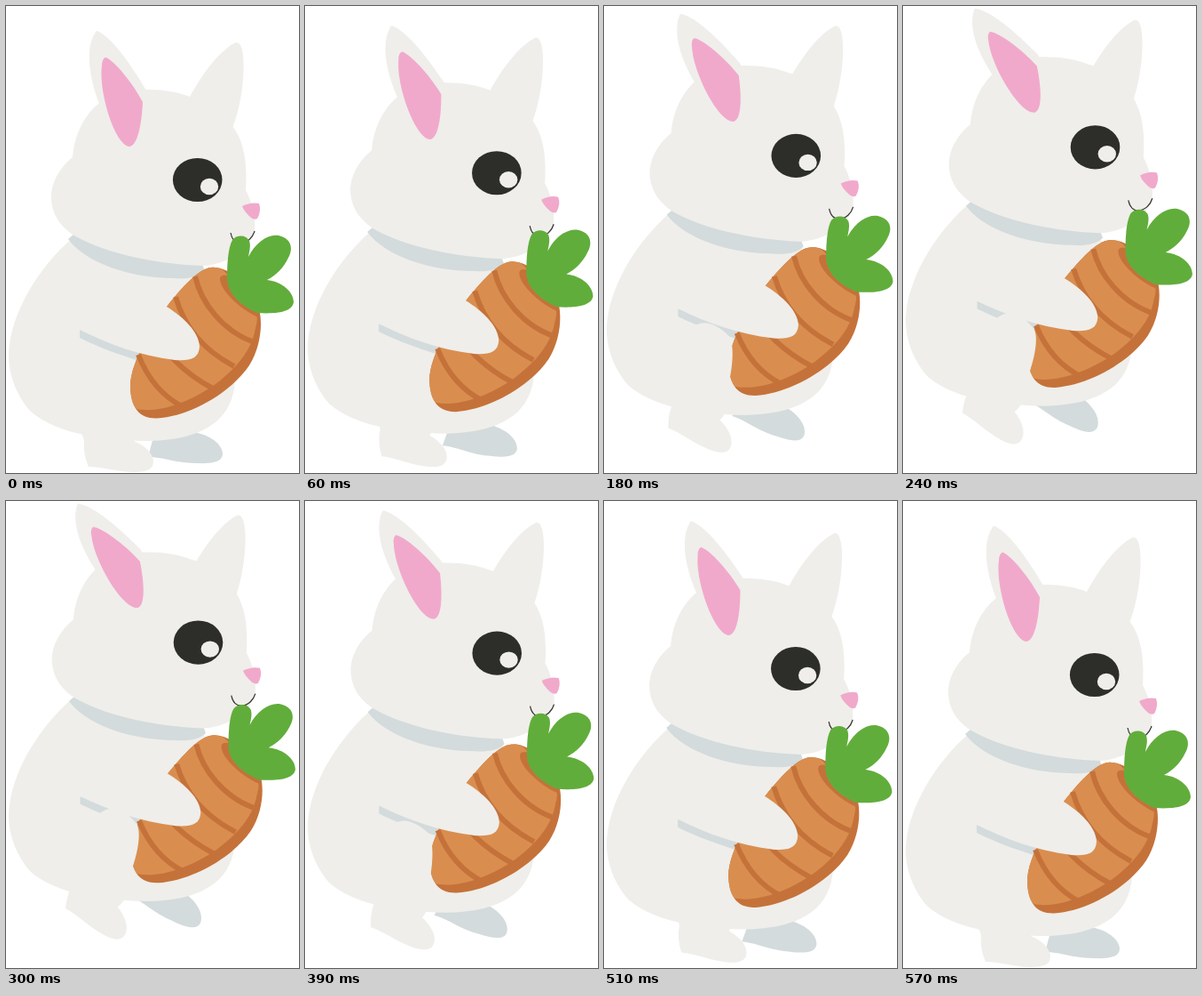
Animation, 330 px wide and 525 px high, one loop 600 ms. Source, as an HTML page:

```html
<!DOCTYPE html>
<html lang="en">
<head>
<meta charset="utf-8">
<title>Hopping rabbit</title>
<style>
  html, body { margin: 0; width: 100%; height: 100%; overflow: hidden; background: #fff; }
  svg { display: block; width: 100vw; height: 100vh; }
  .fur { fill: #efeeea; }
  .shade { fill: #d3dbdc; }
  .pink { fill: #f1a9cb; }
  .dark { fill: #2d2d2a; }
  .rim { fill: #c5723a; }
  .flesh { fill: #d98e4f; }
  .leaf { fill: #61ad3b; }
  .rings { fill: none; stroke: #c5723a; stroke-width: 6; }
  .mouth { fill: none; stroke: #2d2d2a; stroke-width: 1.2; }
</style>
</head>
<body>
<svg viewBox="0 0 330 525">
  <path id="backFoot" class="shade" d="M160 507C178 507 190 514 215 514C236 515 244 511 244 503C243 490 225 480 205 478L170 470Z"/>
  <path id="body" class="fur" d="M76 260C40 290 3 345 3 395C4 425 20 448 28 456C50 475 90 488 160 489C215 488 256 470 258 420C258 380 235 330 222 300L150 280Z"/>
  <path id="collar" class="shade" d="M77 256L70 262C90 289 140 306 190 306C205 307 217 305 224 298L221 290L150 270Z"/>
  <path id="leftEar" class="fur" d="M103 28C120 36 140 65 158 95L165 130L120 140C102 112 83 56 101 29Q102 28 103 28Z"/>
  <path id="rightEar" class="fur" d="M259 41C272 38 270 100 255 137L235 160L200 115L207 102C220 78 240 50 259 41Z"/>
  <g id="head">
    <path class="fur" d="M75 170C77 145 88 123 104 110C125 96 145 94 160 94C178 94 195 97 207 102C230 108 247 122 255 135C268 152 272 175 270 207C277 220 281 236 280 252C276 273 250 290 222 292C160 290 105 275 75 257C58 245 50 230 51 211C53 192 65 178 75 170Z"/>
    <ellipse class="dark" cx="215.7" cy="195.5" rx="27.8" ry="24.6"/>
    <ellipse class="fur" cx="229" cy="203" rx="10.2" ry="9.2"/>
    <path class="mouth" d="M253 255C255 265 260 266.5 264 266.5C272 266.5 278 260 280 253"/>
  </g>
  <path id="nose" class="pink" d="M266 225Q276 220 285 222Q288 230 283 239Q280 241 276 238Q268 231 266 225Z"/>
  <path id="innerEar" class="pink" d="M113 58C122 62 142 85 154 108C153 130 149 157 139 158C122 156 104 95 108 67C108 61 111 57 113 58Z"/>
  <g id="carrot">
    <path class="shade" d="M83 364V373C105 384 125 391 150 399V385Z"/>
    <path class="rim" d="M235 294C222 292 205 308 181 338C165 362 140 400 140 428C141 452 150 464 170 463.5C208 461 254 434 274 404C289 380 289 350 284 338C270 310 250 294 235 294Z"/>
    <path class="flesh" d="M235 294C222 292 205 308 181 338C165 362 140 400 140 428C140 440 143 449 147 453C170 458 205 447 236 425C261 406 277 386 281 362Q284 350 282 349C262 340 240 318 241 306C242 302 246 302 250 303C245 296 240 294 235 294Z"/>
    <path class="rings" d="M213 304C220 335 245 365 277 377M191 327C202 365 228 390 257 405M165 362C180 395 205 415 233 430M149 392C160 420 178 440 200 451"/>
    <path class="leaf" d="M249 308C249 290 250 272 255 263C260 257 270 257 274 264C276 270 274 276 273 282C281 266 295 256 307 258C321 261 324 272 318 283C313 294 304 303 294 308C312 310 324 322 324 333C322 346 298 346 283 345C262 336 250 322 249 308Z"/>
  </g>
  <path id="leg" class="fur" d="M88 488C87 500 89 508 93 518C110 518 125 524 145 524C160 524 166 520 166 512C166 503 156 494 144 489C150 478 146 455 138 442C135 424 129 404 120 397C105 390 92 390 85 395C70 405 70 440 80 465Z"/>
  <path id="arm" class="fur" d="M83 364L110 320L181 338C200 350 217 366 218 383C217 397 207 399 190 398C150 393 115 380 83 364Z"/>
</svg>
<script>
const LOOP = 600, STEP = 30;
// Height of the hop over time: [ms, lift]
const HOP = [[0, 0], [120, .49], [180, .745], [262, 1.045], [300, 1], [390, .67], [450, .44], [570, 0]];

const secant = (a, b) => (HOP[b][1] - HOP[a][1]) / (HOP[b][0] - HOP[a][0]);
const last = HOP.length - 1;
const slopes = HOP.map((_, i) =>
  i === 0 ? secant(0, 1) / 2 :
  i === last ? secant(last - 1, last) / 2 :
  i === 3 ? 0 : secant(i - 1, i + 1));

function liftAt(ms) {
  if (ms >= HOP[last][0]) return 0;
  const i = HOP.findIndex((_, k) => ms < HOP[k + 1][0]);
  const [t0, a] = HOP[i], [t1, b] = HOP[i + 1];
  const d = t1 - t0, u = (ms - t0) / d, v = 1 - u;
  return a * (1 + 2 * u) * v * v + b * u * u * (3 - 2 * u)
    + d * u * v * (slopes[i] * v - slopes[i + 1] * u);
}

const place = (id, transform) =>
  document.getElementById(id).setAttribute('transform', transform);
const move = (id, x, y) => place(id, `translate(${x} ${y})`);
const swing = (id, x, y, angle, px, py) =>
  place(id, `translate(${x} ${y}) rotate(${angle} ${px} ${py})`);

function draw(ms) {
  const k = liftAt(ms);
  move('body', 0, -39 * k);
  move('collar', k, -37 * k);
  move('head', .8 * k, -36.4 * k);
  move('nose', k, -34.3 * k);
  move('rightEar', 2 * k, -25 * k);
  swing('leftEar', 0, -36.5 * k, -14 * k, 139, 119);
  swing('innerEar', 0, -36.8 * k, -14 * k, 139, 119);
  swing('leg', 0, -36 * k, 28 * k, 128, 454);
  swing('backFoot', -5.5 * k, -34 * k, 23 * k, 223, 458);
  const squash = `translate(0 ${-24 * k}) scale(${1 + .006 * k} ${1 - .022 * k})`;
  place('carrot', squash);
  place('arm', squash);
}

const start = performance.now();
function tick() {
  const ms = (performance.now() - start) % LOOP;
  draw(Math.floor(ms / STEP) * STEP);
  requestAnimationFrame(tick);
}
tick();
</script>
</body>
</html>
```
